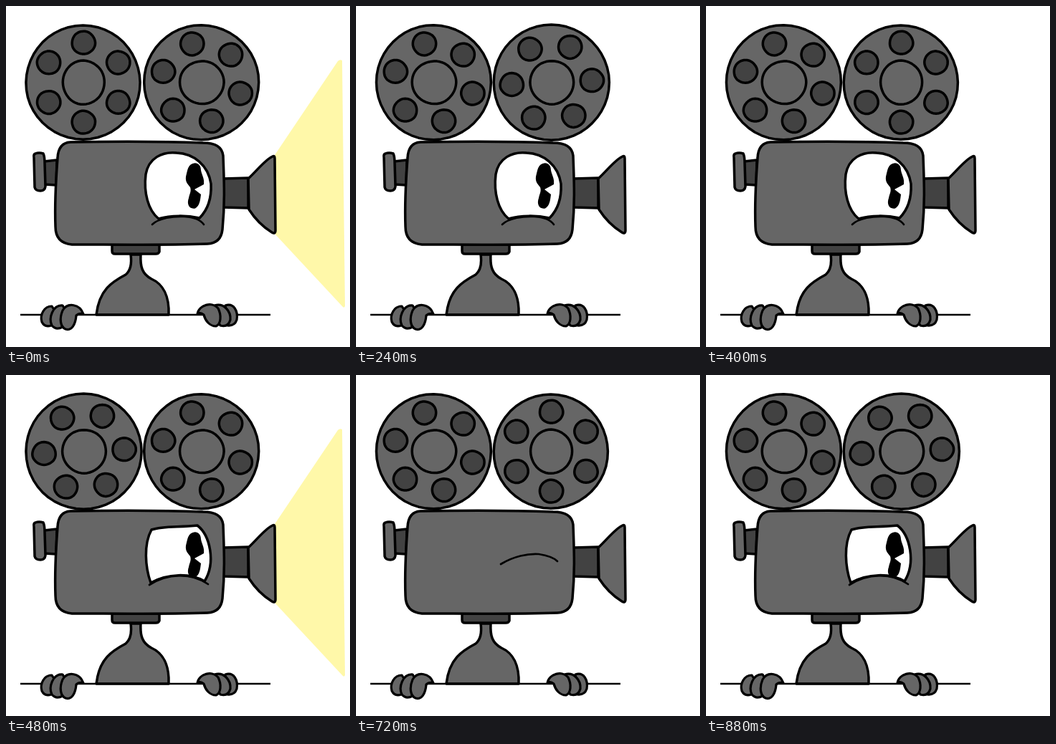
An HTML page for the animation above (0.96 s loop, 480x476 px).

```html
<!DOCTYPE html>
<html lang="en">
<head>
<meta charset="utf-8">
<title>Peeking projector</title>
<style>
  html, body { margin: 0; width: 100%; height: 100%; overflow: hidden; background: #fff; }
  svg { display: block; width: 100%; height: 100%; }
  .ink { stroke: #000; stroke-width: 3.5; stroke-linecap: round; stroke-linejoin: round; }
  .grey { fill: #666; }
  .dark { fill: #424242; }
  .line { fill: none; }
</style>
</head>
<body>
<svg viewBox="0 0 480 476">
  <defs>
    <clipPath id="lids"><path id="lidShape"/></clipPath>
  </defs>

  <path id="beam" fill="#fff8a9" d="M375 208L463 77Q466 74 469 76L473 419Q472 422 470 420L375 318Z"/>

  <g id="reelL" class="ink"></g>
  <g id="reelR" class="ink"></g>

  <g class="ink">
    <path class="dark" d="M53 217L71 215L70 250L54 249Z"/>
    <path class="grey" d="M41 206Q46 204 52 206Q54 210 54 220L55 252Q54 258 48 258Q41 258 40 253L39 212Q38 207 41 206Z"/>
    <path class="dark" d="M303 241L338 240L338 282L303 281Z"/>
    <path class="grey" d="M338 241C350 230 361 215 372 210Q375 208 375 213L376 313Q376 319 371 316C358 308 348 298 339 284Z"/>
    <path class="dark" d="M148 333H214V343Q213 346 209 346H152Q148 346 148 342Z"/>
    <path class="grey" d="M174 347C176 362 173 370 167 375C148 385 130 396 126 431L227 431C228 405 219 388 203 381C190 374 187 364 188 347Z"/>
    <path class="grey" d="M90 190C150 189 220 189 275 191Q301 191 303 209C304 240 306 270 302 312Q300 331 281 332C220 334 150 333 92 333Q69 331 69 308C68 280 69 250 72 212Q73 191 90 190Z"/>
  </g>

  <g id="eye">
    <path id="white" fill="#fff"/>
    <g clip-path="url(#lids)">
      <path id="pupil" d="M257 222C264 216 272 220 272 229C273 236 277 240 276 249L263 256L272 263C271 272 270 279 264 282.5C255 284 252 276 255 268C256 262 259 259 257 253C254 249 250 246 251 238C253 231 253 226 257 222Z"/>
    </g>
    <path id="rim" class="ink line"/>
  </g>
  <path id="crease" class="ink line" style="stroke-width:2.7"/>

  <path d="M20 431H369" stroke="#000" stroke-width="2.4"/>
  <g class="ink grey" style="stroke-width:3.2">
    <path d="M64 419C53 419 47 431 50 441Q54 449 63 446L72 432Z"/>
    <path d="M79 418C65 417 59 436 64 446Q70 453 79 448L86 430Z"/>
    <path d="M108 430C103 416 86 413 79 425C74 437 76 448 83 451C92 454 97 444 98 432Q102 428 108 430Z"/>
    <path d="M306 418C318 414 324 426 322 438Q319 447 309 446Z"/>
    <path d="M291 418C304 414 314 426 313 438Q310 449 299 446L290 430Z"/>
    <path d="M267 430C269 417 288 412 296 422C301 432 300 444 293 447C284 447 278 439 276 431Q271 427 267 430Z"/>
  </g>
</svg>
<script>
const STEP = 80, STEPS = 12;
const $ = id => document.getElementById(id);

// Reel poses: hole angle, sideways drift, outer radius, hub radii
const POSES = [
  { turn: 30, dx: -0.8, r: 79.6, hub: [29, 30.6] },
  { turn: -3, dx: 0, r: 80.6, hub: [30.4, 30.2] },
  { turn: 16, dx: 0, r: 80, hub: [30.8, 29.8] }
];
const CYCLE = [0, 2, 1, 2];

// Eye states: white outline, lid crease, pupil shift
const OPEN = {
  white: "M213 297C198 285 192 260 195 235C199 212 218 203 238 205C262 206 282 222 286 248C287 268 281 285 270 296C252 292 230 292 213 297Z",
  crease: "M204 305C213 296 234 293 250 294C263 295 271 298 276 305",
  shift: [0, 0]
};
const LOWERED = {
  white: "M202 290C194 268 192 236 203 216C220 210 240 213 267 210C285 224 293 262 277 288C257 276 225 277 202 290Z",
  crease: "M200 293C225 277 258 275 282 292",
  shift: [0, 0]
};
const SLIT = {
  white: "M198 271C194 262 194 257 197 253C215 241 240 235 262 237C275 239 283 245 286 251C288 258 285 265 281 268C274 265 262 260 250 261C230 261 212 266 198 271Z",
  crease: "",
  shift: [3, -3]
};
const SHUT = {
  white: "",
  crease: "M202 264C220 253 240 249 255 250C268 252 277 256 281 260",
  shift: [0, 0]
};
const BLINK = [LOWERED, SLIT, SHUT, SHUT, SLIT, LOWERED];
const BLINK_AT = 6;

// Slightly uneven hand-drawn circle
function blob(cls, cx, cy, rx, ry, seed, wobble) {
  const pts = [];
  for (let i = 0; i < 48; i++) {
    const a = i * Math.PI / 24;
    const k = 1 + wobble * (Math.sin(3 * a + seed) + 0.6 * Math.sin(5 * a + seed * 2));
    pts.push((cx + rx * k * Math.cos(a)).toFixed(1) + " " + (cy + ry * k * Math.sin(a)).toFixed(1));
  }
  return `<path class="${cls}" d="M${pts.join("L")}Z"/>`;
}

function reel(x, cy, pose) {
  const { turn, dx, r, hub } = POSES[pose];
  const cx = x + dx;
  let out = blob("grey", cx - 0.7, cy, r, r, pose, 0.002);
  out += blob("grey", cx, cy, hub[0], hub[1], pose + 2, 0.006);
  for (let i = 0; i < 6; i++) {
    const a = (turn + i * 60) * Math.PI / 180;
    out += blob("dark", cx + 56 * Math.cos(a), cy + 55.5 * Math.sin(a), 16.2, 15.9, i * 1.7 + pose, 0.01);
  }
  return out;
}

function draw(step) {
  $("beam").style.display = step % 2 ? "none" : "";
  $("reelL").innerHTML = reel(109, 106.7, CYCLE[step % 4]);
  $("reelR").innerHTML = reel(273.3, 106.7, CYCLE[(step + 3) % 4]);

  const eye = step < BLINK_AT ? OPEN : BLINK[step - BLINK_AT];
  $("eye").style.display = eye.white ? "" : "none";
  for (const id of ["white", "rim", "lidShape"]) $(id).setAttribute("d", eye.white);
  $("pupil").setAttribute("transform", `translate(${eye.shift})`);
  $("crease").setAttribute("d", eye.crease);
}

let shown = -1;
const start = performance.now();
function tick() {
  const step = Math.floor((performance.now() - start) / STEP) % STEPS;
  if (step !== shown) draw(shown = step);
  requestAnimationFrame(tick);
}
tick();
</script>
</body>
</html>
```
